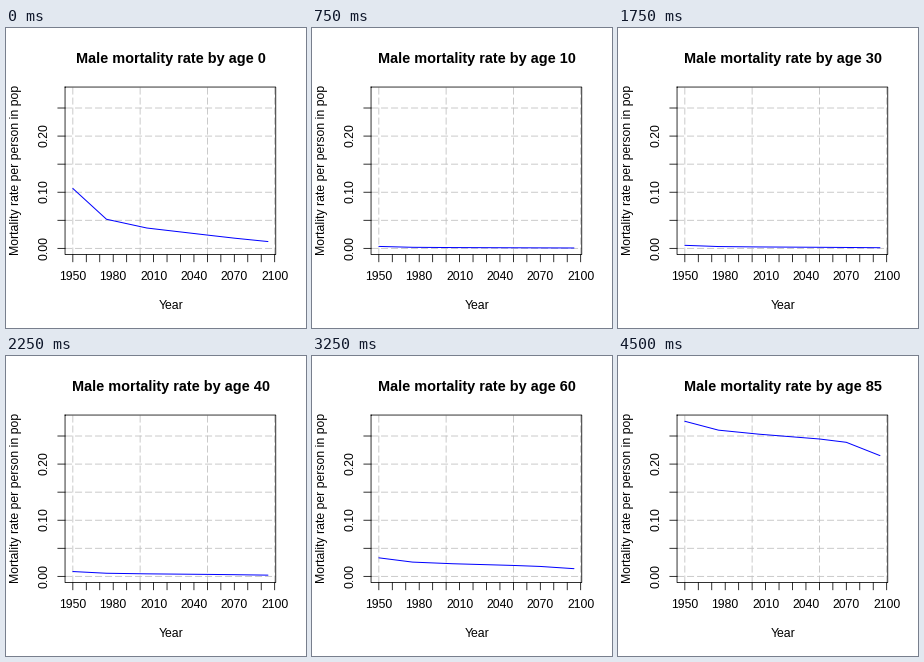
Animation, 300 px wide and 300 px high, one loop 4750 ms. Source, as a matplotlib script:

```python
import numpy as np
import matplotlib.pyplot as plt
from matplotlib.animation import FuncAnimation

SIZE, DPI = 300, 100
PT = 72 / DPI  # points per pixel
LEFT, RIGHT, TOP, BOTTOM = 59.04, 269.76, 59.04, 226.56
TICK = 7.2
INK, GRID = "black", "#bebebe"
THIN = 0.8

AGES = [0, 1, *range(5, 90, 5)]
OPEN_AGE = 86.3  # mean age in the open-ended last group
YEARS = np.arange(1950, 2100, 5)

# Share of the 1950-2095 decline still ahead, for newborns
KNOTS = [1950, 1975, 2005, 2050, 2070, 2095]
AHEAD = np.array([1, 0.42, 0.255, 0.122, 0.064, 0])


def px(year):
    return 66.84 + (year - 1950) * 1.3456


def py(rate):
    return 220.36 - rate * 561.4


def mortality(age, infant, base, at60, growth):
    """Infant peak, constant risk and exponential ageing."""
    x = OPEN_AGE if age == AGES[-1] else age
    return (infant * np.exp(-2 * age ** 0.7) + base
            + at60 * np.exp(growth * (x - 60)))


def rates(age):
    first = mortality(age, 0.1035, 0.0030, 0.0300, 0.0840)
    last = mortality(age, 0.0115, 0.0006, 0.0131, 0.1063)
    # Decline comes later in life at higher ages
    power = 1 - 0.655 * (age / 85) ** 1.25
    return last + (first - last) * np.interp(YEARS, KNOTS, AHEAD ** power)


fig = plt.figure(figsize=(SIZE / DPI, SIZE / DPI), dpi=DPI, facecolor="white")
ax = fig.add_axes([0, 0, 1, 1])
ax.set_xlim(0, SIZE)
ax.set_ylim(SIZE, 0)
ax.axis("off")


def line(xs, ys, color=INK, width=THIN, **kw):
    return ax.plot(xs, ys, color=color, lw=width * PT, snap=False, **kw)[0]


def grid(xs, ys):
    line(xs, ys, GRID, ls=(0, (7 / THIN, 3 / THIN)), zorder=1)


def label(x, y, s, size=12.2, **kw):
    return ax.text(x, y, s, fontsize=size * PT, family="Liberation Sans",
                   color="black", ha="center", va="baseline",
                   rotation_mode="anchor", **kw)


for y in py(np.arange(6) * 0.05):
    grid([LEFT, RIGHT], [y, y])
    line([LEFT - TICK, LEFT], [y, y], zorder=3)
for x in px(np.arange(1950, 2101, 50)):
    grid([x, x], [BOTTOM, TOP])
for x in px(np.arange(1950, 2101, 10)):
    line([x, x], [BOTTOM, BOTTOM + TICK], zorder=3)
line([LEFT, RIGHT, RIGHT, LEFT, LEFT], [TOP, TOP, BOTTOM, BOTTOM, TOP],
     zorder=3, solid_joinstyle="miter")

for year in range(1950, 2101, 30):
    label(px(year), 252.3, str(year))
for rate in (0, 0.1, 0.2):
    label(42, py(rate) - 0.7, f"{rate:.2f}", rotation=90)
label(164.7, 281.2, "Year")
label(13.5, 142, "Mortality rate per person in pop", rotation=90)

title = label(164.7, 35, "", size=14.5, weight="bold")
curve = line([], [], "blue", width=1, zorder=2, solid_capstyle="round")


def update(i):
    age = AGES[i]
    title.set_text(f"Male mortality rate by age {age}")
    curve.set_data(px(YEARS), py(rates(age)))
    return title, curve


anim = FuncAnimation(fig, update, frames=len(AGES), interval=250,
                     repeat=True, repeat_delay=0)
plt.show()
```
